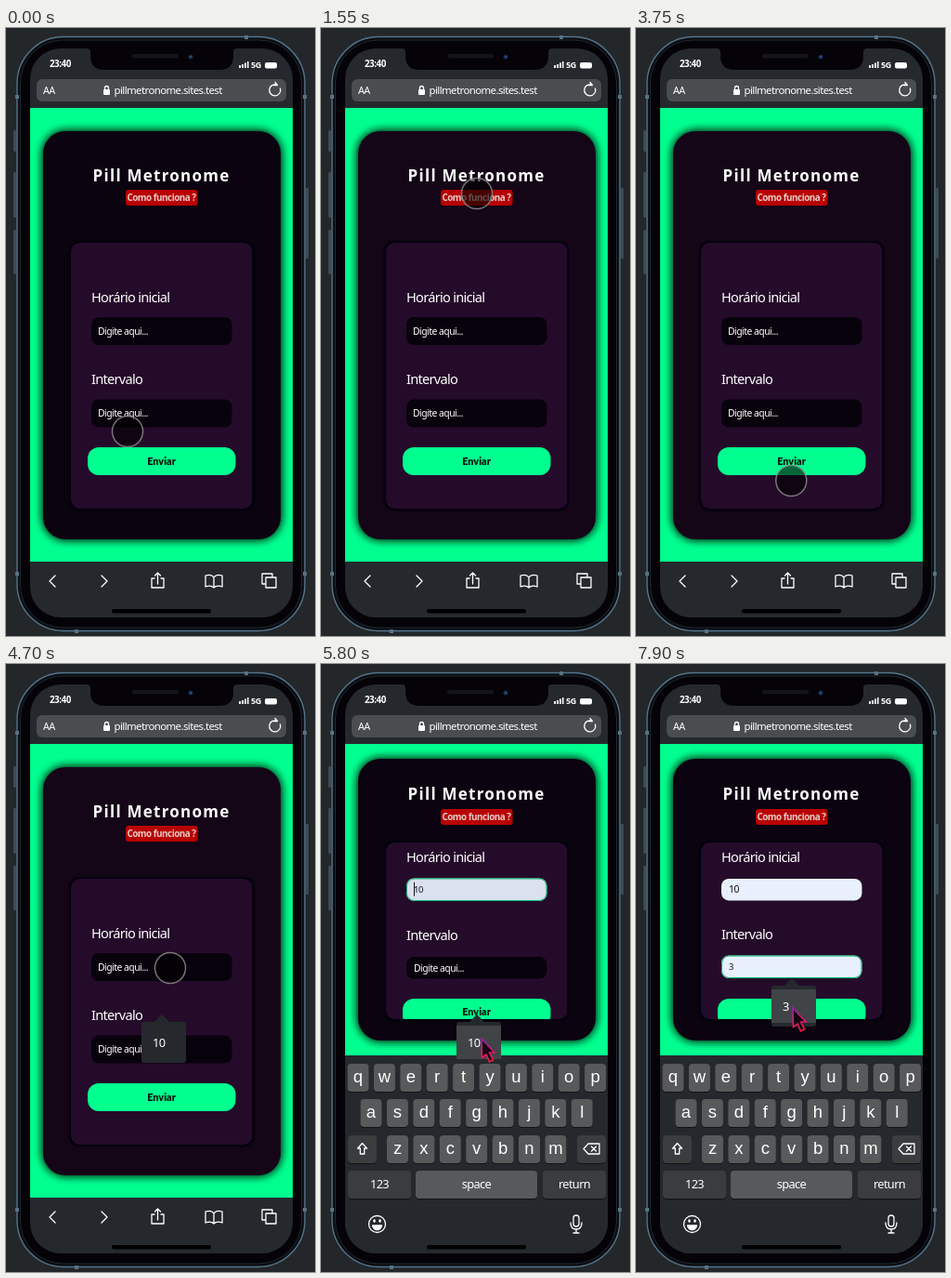
An HTML page that plays this animation: 333x654 px, repeating every 8000 ms.

```html
<!DOCTYPE html>
<html lang="pt">
<head>
<meta charset="utf-8">
<style>
  html, body { margin: 0; width: 100%; height: 100%; overflow: hidden; background: #23272a; }
  svg { display: block; width: 100vw; height: 100vh; }
  text { font-family: "Noto Sans", sans-serif; font-weight: 500; letter-spacing: -.05em; white-space: pre; }
  .bold { font-weight: 700; }
  .title { font-weight: 700; letter-spacing: 1.25px; }
  .display { font-family: Lato, sans-serif; font-weight: 900; letter-spacing: 0; }
  .key { font-family: "Liberation Sans", Arial, sans-serif; letter-spacing: 0; }
  .icon { fill: none; stroke: #fff; stroke-width: 1.3; stroke-linecap: round; stroke-linejoin: round; }
</style>
</head>
<body>
<svg viewBox="0 0 333 654">
  <defs>
    <clipPath id="screenClip"><rect x="26" y="22" width="283" height="612" rx="33"/></clipPath>
    <linearGradient id="arrowEdge" x1="0" y1="0" x2="0" y2="1">
      <stop offset="0" stop-color="#a21caf"/><stop offset="1" stop-color="#ff1744"/>
    </linearGradient>
    <filter id="glow" x="-20%" y="-20%" width="140%" height="140%"><feGaussianBlur stdDeviation="4"/></filter>
    <filter id="soft" x="-20%" y="-20%" width="140%" height="140%"><feGaussianBlur stdDeviation="1"/></filter>
    <filter id="backdrop" x="-20%" y="-20%" width="140%" height="140%"><feGaussianBlur stdDeviation="10"/></filter>
  </defs>

  <!-- phone body -->
  <g fill="#3c4c56">
    <rect x="8" y="110" width="3" height="23" rx="1"/>
    <rect x="8" y="155" width="3" height="49" rx="1"/>
    <rect x="8" y="217" width="3" height="48" rx="1"/>
    <rect x="323" y="172" width="3" height="76" rx="1"/>
  </g>
  <rect x="12" y="9.5" width="310" height="639" rx="50" fill="#0c0d12" stroke="#54758a" stroke-width="1.4"/>
  <rect x="15.5" y="13" width="303" height="632" rx="46" fill="#050308" stroke="#1b2830"/>
  <g fill="#587384">
    <rect x="10" y="72" width="4" height="4"/><rect x="320" y="72" width="4" height="4"/>
    <rect x="10" y="585" width="4" height="4"/><rect x="320" y="585" width="4" height="4"/>
    <rect x="257" y="8" width="4" height="4"/><rect x="74" y="647" width="4" height="4"/>
  </g>

  <g clip-path="url(#screenClip)">
    <rect x="26" y="22" width="283" height="612" fill="#25292d"/>
    <g id="page"></g>
    <g class="icon">
      <path d="M53 589l-6 6 6 6M103 589l6 6-6 6"/>
      <path d="M160 592h-3v10h13v-10h-3M163.500 598v-12m-3 3l3-3 3 3"/>
      <path d="M224 591c-2-3-6-3-9-2v12c3-1 7-1 9 1 2-2 6-2 9-1v-12c-3-1-7-1-9 2v11"/>
      <path d="M279 598h-3v-11h11v3M280 591h11v11h-11z"/>
    </g>
    <g id="keyboard"></g>
    <rect x="114" y="625" width="107" height="4.500" rx="2" fill="#000"/>
  </g>

  <!-- status and address bars -->
  <path d="M87 22q4 0 4 4v4q0 15 15 15h124q15 0 15-15v-4q0-4 4-4z" fill="#050308"/>
  <rect x="136" y="28" width="50" height="4.500" rx="2" fill="#14151a"/>
  <circle cx="199" cy="31" r="2.600" fill="#14284a"/><circle cx="199" cy="31" r="1" fill="#355f92"/>
  <g fill="#fff">
    <text class="bold" x="47" y="42.400" font-size="9.800">23:40</text>
    <path d="M251 40h2v3h-2zM254 39h2v4h-2zM257 37.500h2v5.500h-2zM260 36h1.500v7h-1.500z"/>
    <text class="bold" x="264" y="43" font-size="9">5G</text>
    <rect x="279" y="37" width="13" height="6.500" rx="2"/>
  </g>
  <rect x="33" y="55" width="269" height="24" rx="6" fill="#4a4d50"/>
  <text x="40" y="71" font-size="10.800" fill="#fff">AA</text>
  <rect x="105" y="66" width="7" height="6" rx="1" fill="#fff"/>
  <path class="icon" d="M106.500 66v-1.500a2 2 0 0 1 4 0V66"/>
  <text x="116.500" y="71" font-size="11.400" fill="#fff">pillmetronome.sites.test</text>
  <path class="icon" d="M295.500 65a6 6 0 1 1-3-3.500h-4M292.500 61.500l-2.500-3"/>

  <g id="overlay"></g>
</svg>

<script>
const LOOP = 8000;
const GREEN = '#00ff8f', RED = '#b80000', INK = '#08020d', PURPLE = '#250b2a';
const MODAL = [1800, 3750];
const KEYBOARD_AT = 5000;
const FOCUS_AT = [4800, 7050];
const FILL_AT = [5600, 7600];

// time, x, y
const POINTER = [
  [0, 131, 434], [650, 131, 434], [900, 200, 282], [1450, 168, 178], [2050, 168, 178],
  [2200, 122, 311], [2550, 122, 311], [3300, 167, 488], [3750, 167, 488], [3950, 225, 289],
  [4150, 225, 289], [4450, 177, 327], [4900, 177, 327], [5250, 188, 364], [5500, 173, 403],
  [6300, 173, 403], [6900, 172, 326], [7100, 172, 326], [7500, 169, 370], [LOOP, 169, 370]
];
const POPUPS = [
  { from: 4700, to: 6300, top: 385, value: '10' },
  { from: 7050, to: LOOP, top: 346, value: '3' }
];

const $ = id => document.getElementById(id);
const mix = (a, b, k) => a + (b - a) * k;
const during = (t, [from, to]) => t >= from && t < to;
const easeOut = (t, start, length) =>
  1 - (1 - Math.min(1, Math.max(0, (t - start) / length))) ** 2.5;

const box = (x, y, w, h, r, fill, extra = '') =>
  `<rect x="${x}" y="${y}" width="${w}" height="${h}" rx="${r}" fill="${fill}" ${extra}/>`;

// cy is the middle of the capital letters
const label = (str, x, cy, size, fill = '#fff', extra = '') =>
  `<text x="${x}" y="${cy + size * 0.36}" font-size="${size}" fill="${fill}" ${extra}>${str}</text>`;
const centered = (str, x, cy, size, fill, extra = '') =>
  label(str, x, cy, size, fill, `text-anchor="middle" ${extra}`);
const style = name => `class="${name}"`;

function pointerAt(t) {
  const i = POINTER.findIndex(p => p[0] > t);
  const [t0, x0, y0] = POINTER[i - 1], [t1, x1, y1] = POINTER[i];
  const k = (t - t0) / (t1 - t0);
  return [mix(x0, x1, k), mix(y0, y1, k)];
}

function field(t, index, cy, baseHeight) {
  const focus = t >= FOCUS_AT[1] ? 1 : t >= FOCUS_AT[0] ? 0 : -1;
  const focused = focus === index;
  const h = baseHeight + (focused ? 1 : 0), y = cy - h / 2;
  const filled = easeOut(t, FILL_AT[index], 300);
  let out = box(92, y, 151.5, h, 8, INK);
  if (filled) {
    out += box(92, y, 151.5, h, 8, '#e8f0fe', `opacity="${filled}"`)
         + label(POPUPS[index].value, 100, cy - 0.5, t < POPUPS[index].to ? 9.4 : 10.4, '#111');
  } else {
    out += label('Digite aqui...', focus < 0 ? 99 : 100, cy, 10.4);
  }
  if (focused) {
    out += box(92.5, y + 0.5, 150.5, h - 1, 8, 'none', 'stroke="#00b96b"');
    if ((t - FOCUS_AT[index]) % 1000 < 500)
      out += box(100, cy - 8, 1, 15, 0, filled ? '#111' : '#fff');
  }
  return out;
}

function card(t) {
  const open = t >= KEYBOARD_AT;
  const p = easeOut(t, KEYBOARD_AT, 500);
  const height = mix(439, 303, p), top = (open ? 253.5 : 330.5) - height / 2;
  const formTop = top + mix(120, 90, p), formHeight = mix(286, 190, p);
  const mid = formTop + formHeight / 2;
  const inputHeight = mix(30, 23.5, p), lift = t >= FOCUS_AT[1] ? 1 : 0;
  const fill = t >= 50 && !open ? '#150617' : '#0b0310';

  return box(38.5, top - 1.5, 259, height + 3, 26, '#001409', 'filter="url(#glow)"')
    + box(40, top, 256, height, 24, fill)
    + centered('Pill Metronome', 167.6, top + mix(47.5, 38, p), 17, '#fff', style('title'))
    + box(129, top + mix(63, 54, p), 77.5, 17, 3, RED)
    + centered('Como funciona ?', 167.5, top + mix(71.5, 62.5, p), 9.9, '#e6cdca', style('bold'))
    + box(68, formTop - 2, 199.5, formHeight + 4, 10, '#05000d', 'filter="url(#soft)"')
    + `<clipPath id="formClip">${box(70, formTop, 195.5, formHeight, 9, '#000')}</clipPath>`
    + '<g clip-path="url(#formClip)">'
    + box(70, formTop, 195.5, formHeight, 9, PURPLE)
    + label('Horário inicial', 92, mid + mix(-84, -79, p), 14.6)
    + field(t, 0, mid + mix(-48, -44.3, p), inputHeight)
    + label('Intervalo', 92, mid + mix(4, 5, p) - lift, 14.6)
    + field(t, 1, mid + mix(40.5, 39.8, p) - lift, inputHeight)
    + box(88, mid + mix(77, 73, p), 159.5, 30, 12, GREEN)
    + centered('Enviar', 167.5, mid + mix(92, 86.8, p), 10.8, '#07130c', style('display'))
    + '</g>';
}

function modal() {
  const grey = '#c9c4cb';
  const heading = (str, y) => centered(str, 167, y, 16.3, grey, style('display'));
  const lines = (top, rows, extra = '') => rows.map((row, i) =>
    label(row.trimStart(), row[0] === ' ' ? 73.5 : 61.5, top + i * 19.2, 12, grey, extra)).join('');
  return box(26, 86, 283, 488, 0, '#000', 'opacity=".76"')
    + box(26, 86, 283, 1, 0, '#2f8a5c')
    + box(54, 157, 227, 353, 7, '#260b2c')
    + heading('Para que serve?', 181)
    + lines(205, [' O Pill Metronome indica os horários', 'corretos para tomar remédio de acordo', 'com o intervalo de horas desejado.'])
    + heading('Como usar?', 268.5)
    + lines(294, [" No campo 'Horario inicial' insira o", 'primeiro horário em que se deseja', 'tomar o remédio.', " Já no campo 'Intervalo' insira o tempo", 'de intervalo em horas entre as doses.'])
    + lines(409, ['OBS: Ambos os campos devem ser', 'preenchidos APENAS com números.'], style('bold'))
    + box(131, 479, 73, 23.5, 3, RED)
    + centered('Fechar', 167.5, 491, 10.1, '#d8c4c4', style('bold'));
}

function keyboard() {
  const key = (x, y, w, fill) => box(x, y + 1, w, 30, 4, '#101214') + box(x, y, w, 30, 4, fill);
  const light = '#57595b', dark = '#3a3c3e';
  const row = (letters, x, y) => [...letters].map((c, i) =>
    key(x + i * 28.4, y, 23, light) + centered(c, x + 11.5 + i * 28.4, y + 13, 18.5, '#fff', style('key'))).join('');
  const wide = (str, x, w, fill) => key(x, 545, w, fill) + centered(str, x + w / 2, 559.5, 12.8, '#fff');
  return box(26, 421, 283, 213, 0, '#25292d')
    + row('qwertyuiop', 28.5, 430) + row('asdfghjkl', 42.5, 468) + row('zxcvbnm', 71, 507)
    + key(29, 507, 31, dark) + key(276, 507, 31, dark)
    + wide('123', 29, 68, dark) + wide('space', 102, 131, light) + wide('return', 239, 68, dark)
    + `<g class="icon">
        <path d="M44.500 515.500l-5 5.500h2.800v6h4.400v-6h2.800z"/>
        <path d="M283 521.500l5-5.500h12v11h-12zM291.500 519l5 5m0-5l-5 5"/>
        <circle cx="60.500" cy="602.500" r="9"/>
        <path d="M55.500 604h10q-1 4.500-5 4.500t-5-4.500z" fill="#fff"/>
        <path d="M57.500 598.500v1M63.500 598.500v1" stroke-width="2.400"/>
        <rect x="272" y="593" width="6" height="12" rx="3"/>
        <path d="M269 601q0 7 6 7t6-7M275 608v4m-3 0h6"/>
      </g>`;
}

function popup({ top, value }, hovered) {
  return `<path d="M159 ${top + 1}l9-9 9 9z" fill="#25292d"/>`
    + box(146, top, 48, 44, 3, '#25292d')
    + (hovered ? box(146, top + 4, 48, 36, 0, '#414446') : '')
    + label(value, 158, top + 22.5, 12.8);
}

function pointer(x, y, arrow) {
  const shape = arrow
    ? '<path d="M0 0L14 15H8.500L12.500 23 8.500 25 5 17 .5 20.500z" fill="#14060f" stroke="url(#arrowEdge)" stroke-width="1.600"/>'
    : '<circle r="16.500" fill="#000" fill-opacity=".6" stroke="#8a8a8a" stroke-opacity=".85" stroke-width="1.500"/>';
  return `<g transform="translate(${x} ${y})">${shape}</g>`;
}

function draw(t) {
  const showModal = during(t, MODAL), typing = t >= KEYBOARD_AT;
  const [x, y] = pointerAt(t);
  const menu = POPUPS.find(m => during(t, [m.from, m.to]));
  const hovered = menu && x > 146 && x < 194 && y > menu.top;
  const pageHeight = typing ? 335 : 488;

  $('page').innerHTML = `<clipPath id="pageClip">${box(26, 86, 283, pageHeight, 0, '#000')}</clipPath>`
    + '<g clip-path="url(#pageClip)">' + box(26, 86, 283, pageHeight, 0, GREEN)
    + `<g ${showModal ? 'filter="url(#backdrop)"' : ''}>${card(t)}</g>`
    + (showModal ? modal() : '') + '</g>';
  $('keyboard').style.display = typing ? '' : 'none';
  $('overlay').innerHTML = (menu ? popup(menu, hovered) : '') + pointer(x, y, hovered);
}

$('keyboard').innerHTML = keyboard();
const start = performance.now();
function tick() {
  draw((performance.now() - start) % LOOP);
  requestAnimationFrame(tick);
}
tick();
</script>
</body>
</html>
```
